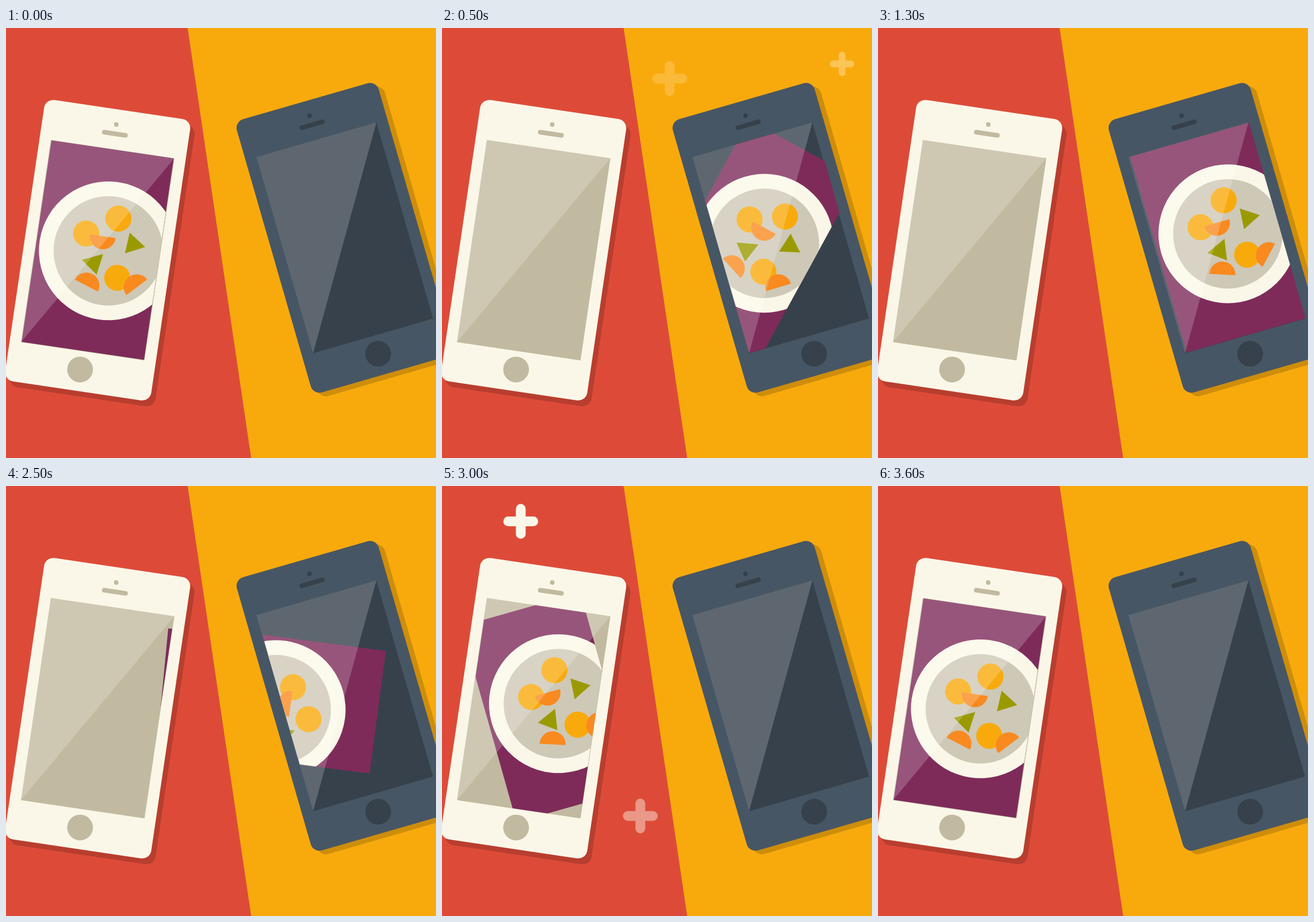
Write an HTML page with a canvas that moves like this. It is 748 px wide and 748 px high and loops after 4.9 s.

```html
<!DOCTYPE html>
<html lang="en">
<head>
<meta charset="utf-8">
<title>Phone to phone</title>
<style>
  html, body { margin: 0; width: 100%; height: 100%; overflow: hidden; background: #dd4b38; }
  canvas { display: block; width: 748px; height: 748px; }
</style>
</head>
<body>
<canvas id="stage" width="748" height="748"></canvas>
<script>
const ctx = document.getElementById('stage').getContext('2d');
const LOOP = 4900, STEP = 100, RETURN = 2400, TRAVEL = 1200;
const DISTANCE = 409, SLOPE = -0.05, SPIN = 0.945;
const RAD = Math.PI / 180;
const CREAM = '#fbf7e8', ORANGE = '#f8aa0d', CARROT = '#f88a20', GREEN = '#9a9a00';
const SCREEN = { x: -108.6, y: -177.7, w: 217.2, h: 355.4 };

// rest: picture centre when it lies in the phone; clip: left and right limits
const white = {
  x: 159.5, y: 386.5, tilt: 8.4, body: CREAM, inset: '#c1baa0',
  rest: { x: 159.5, y: 386.3 }, clip: [-108, 108]
};
const dark = {
  x: 589.25, y: 365, tilt: -16.1, body: '#475664', inset: '#36414c',
  rest: { x: 591.2, y: 364.5 }, clip: [-108.3, 110.5]
};

const pluses = [
  { x: 696, y: 62.5, size: 0.7, peak: 360 },
  { x: 396, y: 88, size: 1, peak: 670 },
  { x: 649.5, y: 687.5, size: 1, peak: 1016 },
  { x: 137, y: 61.5, size: 1, peak: 3000 },
  { x: 345, y: 574, size: 1, peak: 3115 },
  { x: 80, y: 691.5, size: 0.7, peak: 3380 }
];
const FADE = 210;

function placed(x, y, degrees, draw) {
  ctx.save();
  ctx.translate(x, y);
  ctx.rotate(degrees * RAD);
  draw();
  ctx.restore();
}

function polygon(color, ...points) {
  ctx.fillStyle = color;
  ctx.beginPath();
  points.forEach(([x, y]) => ctx.lineTo(x, y));
  ctx.fill();
}

function arc(color, x, y, r, from = 0, to = 360) {
  ctx.fillStyle = color;
  ctx.beginPath();
  ctx.arc(x, y, r, from * RAD, to * RAD);
  ctx.fill();
}

function block(color, x, y, w, h, r = 0) {
  ctx.fillStyle = color;
  ctx.beginPath();
  ctx.roundRect(x, y, w, h, r);
  ctx.fill();
}

function drawBackground() {
  ctx.fillStyle = '#dd4b38';
  ctx.fillRect(0, 0, 748, 748);
  polygon(ORANGE, [316, 0], [748, 0], [748, 748], [426.5, 748]);
}

function drawPicture() {
  block('#7e2b5a', -107.6, -177.2, 215.2, 354.4);
  ctx.beginPath();
  ctx.rect(-107.6, -177.2, 215.2, 354.4);
  ctx.clip();
  ctx.translate(18.5, -1.4);
  arc(CREAM, 0, 0, 120.7);
  arc('#cec8b6', 0, 0, 95.2);
  arc(ORANGE, -42.5, -24.1, 22.7);
  arc(ORANGE, 9.1, -58, 22.7);
  arc(ORANGE, 22.2, 44.2, 22.7);
  arc(CARROT, -13.1, -23.8, 22.7, 0, 180);
  arc(CARROT, -28.9, 65.4, 22.7, 199, 379);
  arc(CARROT, 58.2, 55.6, 22.7, 134.5, 314.5);
  polygon(GREEN, [32.1, -36.6], [62.4, -15.8], [29.3, 0.2]);
  polygon(GREEN, [-43.2, 22.1], [-8.1, 6.8], [-14.2, 44]);
}

function drawPhone(phone, offset) {
  const { x, y, w, h } = SCREEN;
  placed(phone.x, phone.y, phone.tilt, () => {
    block('rgba(0,0,0,0.17)', -119.4, -238.4, 256.8, 494.8, 16);
    block(phone.body, -128.4, -247.4, 256.8, 494.8, 16);
    arc(phone.inset, 0, -221, 4);
    block(phone.inset, -22.7, -208.7, 45.4, 8, 4);
    arc(phone.inset, 0, 209.8, 22.4);
    block(phone.inset, x, y, w, h);
  });

  // the picture rolls along the line between the phones
  ctx.save();
  placed(phone.x, phone.y, phone.tilt, () => {
    ctx.beginPath();
    ctx.rect(phone.clip[0], y, phone.clip[1] - phone.clip[0], h);
  });
  ctx.clip();
  placed(phone.rest.x + offset, phone.rest.y + offset * SLOPE,
    phone.tilt - offset * SPIN, drawPicture);
  ctx.restore();

  placed(phone.x, phone.y, phone.tilt, () =>
    polygon('rgba(255,255,255,0.2)', [x, y], [x + w, y], [x, y + h]));
}

function drawPlus({ x, y, size, peak }, time) {
  const alpha = 1 - Math.abs(time - peak) / FADE;
  if (alpha <= 0) return;
  ctx.save();
  ctx.translate(x, y);
  ctx.scale(size, size);
  ctx.globalAlpha = alpha;
  ctx.strokeStyle = CREAM;
  ctx.lineWidth = 17;
  ctx.lineCap = 'round';
  ctx.beginPath();
  ctx.moveTo(-21.8, 0);
  ctx.lineTo(21.8, 0);
  ctx.moveTo(0, -21.8);
  ctx.lineTo(0, 21.8);
  ctx.stroke();
  ctx.restore();
}

function easeOut(time) {
  const p = Math.min(Math.max(time / TRAVEL, 0), 1);
  return 1 - (1 - p) ** 4;
}

function render(time) {
  const moved = DISTANCE * (easeOut(time) - easeOut(time - RETURN));
  drawBackground();
  drawPhone(white, moved);
  drawPhone(dark, moved - DISTANCE);
  pluses.forEach(plus => drawPlus(plus, time));
}

const start = performance.now();
function tick() {
  const time = (performance.now() - start) % LOOP;
  render(Math.floor(time / STEP) * STEP);
  requestAnimationFrame(tick);
}
tick();
</script>
</body>
</html>
```
